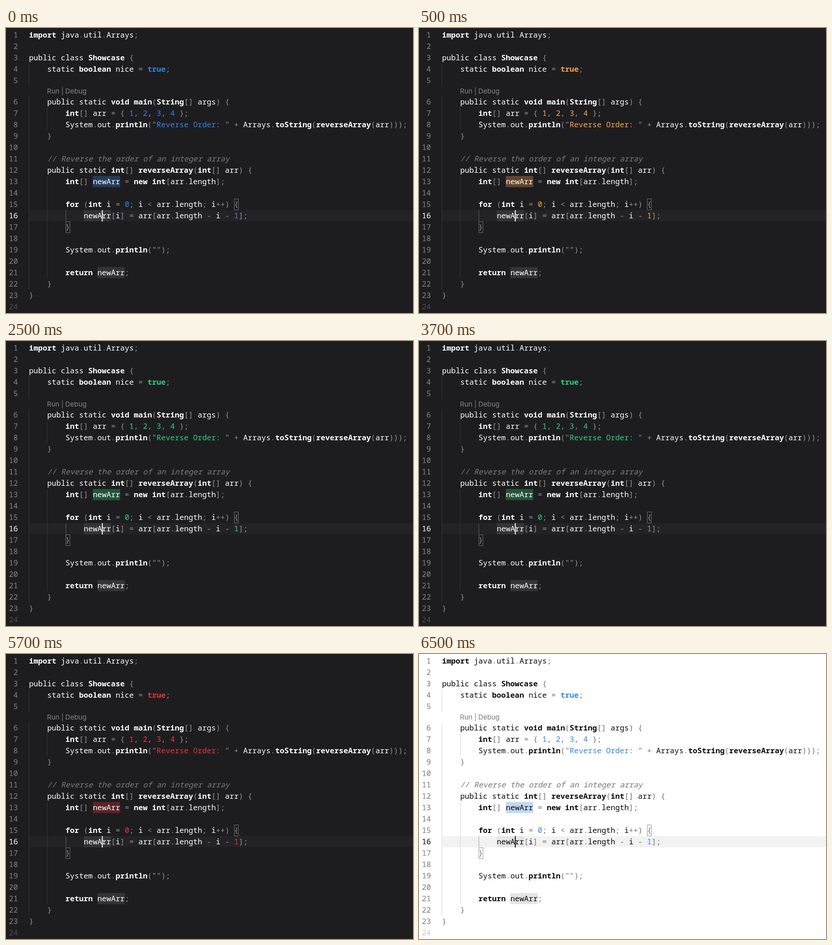
Recreate the animation shown at these times as an HTML page. Size 894 by 626 pixels, loop 8000 ms.

```html
<!DOCTYPE html>
<html lang="en">
<head>
<meta charset="utf-8">
<title>Editor themes</title>
<style>
  html, body { margin: 0; width: 100%; height: 100%; overflow: hidden; }
  body { animation: theme 8s step-end infinite; background: var(--bg); }
  svg { display: block; width: 100%; height: 100%; }
  text { font: 16.7px "Noto Sans Mono", monospace; white-space: pre; fill: var(--fg); font-variant-ligatures: none; }
  .key { font-weight: 700; }
  .val { fill: var(--accent); }
  .bool { fill: var(--accent); font-weight: 700; }
  .punct { fill: var(--punct); }
  .note { fill: var(--note); font-style: italic; }
  .num { fill: var(--num); text-anchor: end; }
  .now { fill: var(--fg); }
  .faint { fill: var(--faint); }
  .lens { font: 15px Inter, sans-serif; fill: var(--num); }
  .page { fill: var(--bg); }
  .row { fill: var(--row); }
  .sel { fill: var(--accent); fill-opacity: .3; }
  .word { fill: var(--word); }
  .guide { fill: var(--guide); }
  .active { fill: var(--active); }
  .caret { fill: var(--fg); }
  .match { fill: none; stroke: var(--match); }

  @keyframes theme {
    0% {
      --accent: #3584e4;
      --bg: #1d1d20; --fg: #fff; --punct: #929294; --note: #7c7c7f;
      --num: #858588; --faint: #4c4c4f; --row: #232325; --word: #343437;
      --guide: #38383b; --active: #626265; --match: #747477;
    }
    6.25% { --accent: #ffa348; }
    31.25% { --accent: #33d17a; }
    56.25% { --accent: #ed333b; }
    81.25% {
      --accent: #3584e4;
      --bg: #fff; --fg: #0a0a0a; --punct: #707070; --note: #777;
      --num: #7b7b7b; --faint: #c6c6c6; --row: #f2f2f3; --word: #e5e5e5;
      --guide: #d6d6d6; --active: #999; --match: #909090;
    }
  }
</style>
</head>
<body>
<svg id="editor" viewBox="0 0 894 626"></svg>
<script>
const code = `import java.util.Arrays;

public class Showcase {
    static boolean nice = true;

    public static void main(String[] args) {
        int[] arr = { 1, 2, 3, 4 };
        System.out.println("Reverse Order: " + Arrays.toString(reverseArray(arr)));
    }

    // Reverse the order of an integer array
    public static int[] reverseArray(int[] arr) {
        int[] newArr = new int[arr.length];

        for (int i = 0; i < arr.length; i++) {
            newArr[i] = arr[arr.length - i - 1];
        }

        System.out.println("");

        return newArr;
    }
}
`.split("\n");

const LEFT = 50.4, CELL = 10.02, ROW = 25;
const colX = col => LEFT + col * CELL;
// The code lens pushes line 6 and below down.
const rowY = n => (n - 1) * ROW + (n > 5 ? 24.7 : 2.5);
const baseline = n => rowY(n) + 18.2;

const esc = s => s.replace(/&/g, "&amp;").replace(/</g, "&lt;");
const span = (cls, s) => `<tspan class="${cls}">${esc(s)}</tspan>`;
const rect = (cls, x, y, w, h) =>
  `<rect class="${cls}" x="${x}" y="${y}" width="${w}" height="${h}"/>`;
const cells = (cls, n, col, len) =>
  rect(cls, colX(col), Math.round(rowY(n)), len * CELL, ROW - .5);
const guide = (cls, col, from, to) =>
  rect(cls, Math.round(colX(col)), Math.round(rowY(from)), 1, (to - from + 1) * ROW - 1);
const bracket = (n, col) =>
  rect("match", Math.round(colX(col)) + .5, Math.round(rowY(n)) + .5, 9, ROW - 1);

const token = /(\/\/.*)|"([^"]*)"|\b(import|Showcase|boolean|void|main|String|int|println|toString|reverseArray|for|new|return)\b|\b(true)\b|\b(\d+)\b|([^\w\s"]+)|(\w+|\s+)/g;

function paint(line) {
  return line.replace(token, (all, note, str, key, bool, num, punct) => {
    if (note) return span("note", note);
    if (str !== undefined)
      return span("punct", '"') + (str && span("val", str)) + span("punct", '"');
    if (key) return span("key", key);
    if (bool) return span("bool", bool);
    if (num) return span("val", num);
    return punct ? span("punct", punct) : all;
  });
}

function drawLine(line, i) {
  const n = i + 1, y = baseline(n), body = line.trimStart();
  const state = n === 16 ? " now" : n === 24 ? " faint" : "";
  return `<text class="num${state}" x="26.2" y="${y}">${n}</text>` +
    (body && `<text x="${colX(line.length - body.length)}" y="${y}">${paint(body)}</text>`);
}

document.getElementById("editor").innerHTML = [
  rect("page", 0, 0, 894, 626),
  rect("row", 50, 400, 844, 24.5),
  cells("sel", 13, 14, 6),
  cells("word", 16, 12, 6),
  cells("word", 21, 15, 6),
  guide("guide", 0, 4, 5),
  guide("guide", 0, 6, 22),
  guide("guide", 4, 7, 8),
  guide("guide", 4, 13, 21),
  guide("active", 8, 16, 16),
  bracket(15, 45),
  bracket(17, 8),
  ...code.map(drawLine),
  `<text class="lens" y="143.5"><tspan x="90">Run</tspan><tspan x="121.6">|</tspan><tspan x="130.2">Debug</tspan></text>`,
  rect("caret", 210.5, 400, 2, 25)
].join("");
</script>
</body>
</html>
```
